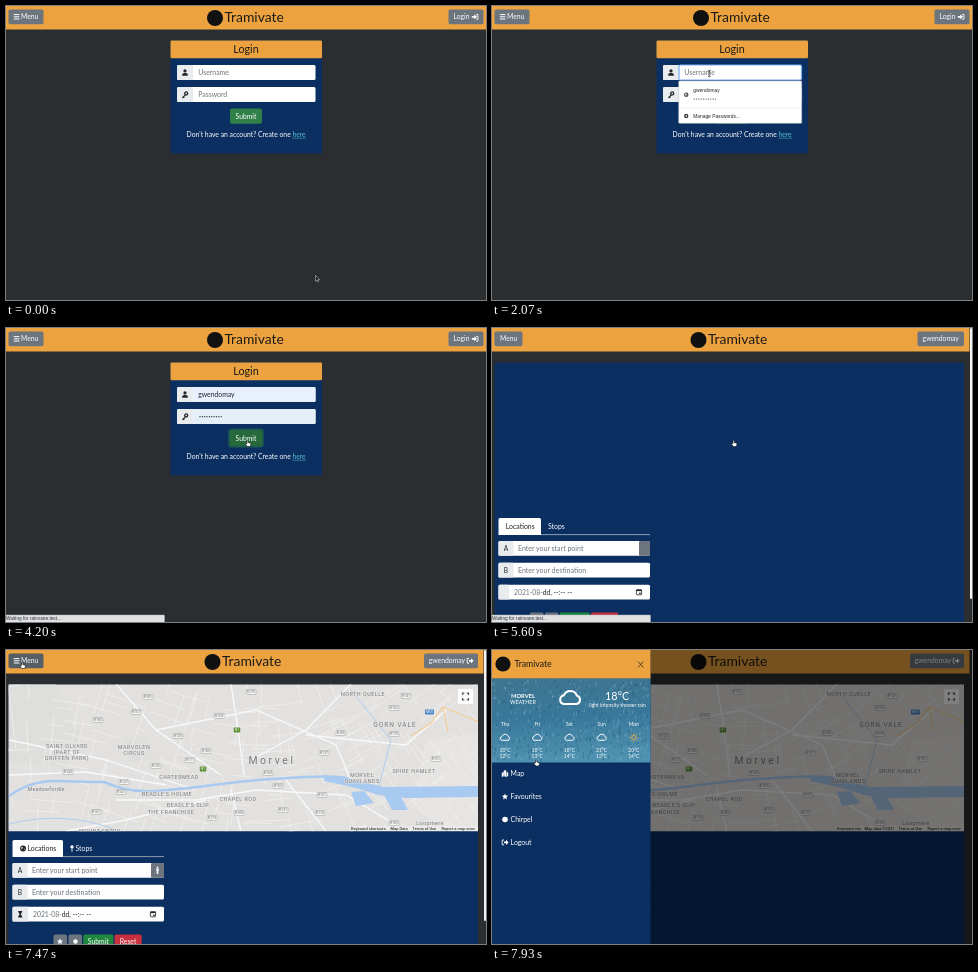
An HTML page that plays this animation: 480 px wide and 294 px high, repeating every 8000 ms.

```html
<!DOCTYPE html>
<html lang="en">
<head>
<meta charset="utf-8">
<title>Tramivate</title>
<style>
  html, body { margin: 0; width: 100%; height: 100%; overflow: hidden; background: #2b2e30; }
  svg { display: block; width: 100vw; height: 100vh; }
  text { font-family: Lato, "Open Sans", sans-serif; white-space: pre; }
  .sys { font-family: "Liberation Sans", Roboto, sans-serif; }
  .map { font-family: Roboto, "Liberation Sans", sans-serif; }
</style>
</head>
<body>
<svg id="stage" viewBox="0 0 480 294" preserveAspectRatio="none"></svg>
<script>
const LOOP = 8000;
const ORANGE = '#eca33f', NAVY = '#0b2f60', DARK = '#2b2e30', GREY = '#6c757d';
const GREEN = '#2f8048', INK = '#212529', PALE = '#e9ecef', WHITE = '#fff';
const BRAND = 'Tramivate', USER = 'gwendomay', CITY = 'Morvel';

const rect = (x, y, w, h, fill, r = 0, extra = '') =>
  `<rect x="${x}" y="${y}" width="${w}" height="${h}" rx="${r}" fill="${fill}" ${extra}/>`;
const text = (x, y, s, size = 6.8, fill = WHITE, extra = '') =>
  `<text x="${x}" y="${y}" font-size="${size}" fill="${fill}" ${extra}>${s}</text>`;
const path = (d, fill = WHITE, extra = '') => `<path d="${d}" fill="${fill}" ${extra}/>`;
const line = (d, color, w = 1, extra = '') =>
  path(d, 'none', `stroke="${color}" stroke-width="${w}" ${extra}`);
const dot = (x, y, r, fill) => `<circle cx="${x}" cy="${y}" r="${r}" fill="${fill}"/>`;
const group = (id, body, extra = '') => `<g id="${id}" ${extra}>${body}</g>`;
const at = (x, y, body) => `<g transform="translate(${x} ${y})">${body}</g>`;
const MID = 'text-anchor="middle"';

// Small linear congruential generator
const random = seed => () => (seed = seed * 16807 % 2147483647) / 2147483647;

// Icons, centred on 0,0
const icon = {
  bars: line('M-2.8-2.2H2.8M-2.8 0H2.8M-2.8 2.2H2.8', WHITE, 1),
  user: dot(0, -1.6, 1.6, INK) + path('M-2.8 3.2V2Q-2.6.4-.9.4H.9Q2.6.4 2.8 2V3.2Z', INK),
  key: line('M.4.4L-2.6 3.2M-1.8 2.2L-.7 3.2', INK, 1.2) +
    '<circle cx="1.2" cy="-1.1" r="1.5" fill="none" stroke="#212529" stroke-width="1.3"/>',
  enter: path('M-3.2-.9H-.7V-2.6L2 0L-.7 2.6V.9H-3.2Z') + line('M1.1-2.4H2.9V2.4H1.1', WHITE, .9),
  exit: path('M-1-.9H1V-2.6L3.6 0L1 2.6V.9H-1Z') + line('M-1-2.4H-2.8V2.4H-1', WHITE, .9),
  star: path('M0-3.2L.9-1.1L3.1-.9L1.4.6L2 2.8L0 1.6L-2 2.8L-1.4.6L-3.1-.9L-.9-1.1Z'),
  person: dot(0, -2.9, .9, WHITE) + path('M-1.2-1.7H1.2V.8H.8V3.6H-.8V.8H-1.2Z'),
  glass: path('M-2.2-3.3H2.2V-2.6H1.8Q1.7-.8.5 0Q1.7.8 1.8 2.6H2.2V3.3H-2.2V2.6H-1.8Q-1.7.8-.5 0Q-1.7-.8-1.8-2.6H-2.2Z', INK),
  pin: dot(0, -1.6, 1.7, WHITE) + line('M0 0V3.2', WHITE, .9),
  globe: dot(0, 0, 3, INK) + path('M-2.3-.9L-.6-1.8L.2-.6L-1 .2L-.7 1.6Q-2 .8-2.3-.9ZM1 .2L2.2 0L1.4 1.8Z', '#c9cdd1'),
  fold: path('M-3.2-1L-1.2-1.8V2.6L-3.2 3.2ZM-.8-1.8L1 -1V3.2L-.8 2.6ZM1.4-1L3.2-1.8V2.4L1.4 3.2Z') + dot(0, -2, 1.4, WHITE),
  date: rect(-2.6, -2.2, 5.2, 5, 'none', .5, 'stroke="#212529" stroke-width=".8"') +
    rect(-2.6, -2.4, 5.2, 1.5, INK) + rect(.2, .6, 1.5, 1.4, INK),
  cloud: line('M-3 2.8H3A2 2 0 0 0 3.2-1.1A3.2 3.2 0 0 0-2.8-1.3A2.1 2.1 0 0 0-3 2.8Z', WHITE, .95),
  sun: line('M0-4.6V4.6M-4.6 0H4.6M-3.2-3.2L3.2 3.2M-3.2 3.2L3.2-3.2', '#e9b04a', .7) + dot(0, 0, 3, '#4d86a3') +
    '<circle r="2.1" fill="none" stroke="#e9b04a" stroke-width=".9"/>'
};

const button = (x, w, body, fill = GREY, extra = '') => rect(x, 3.5, w, 14.7, fill, 1.8, extra) + body;
const header = (w, cx) => rect(0, 0, w, 23.5, ORANGE) + dot(cx, 12, 8, '#111') +
  text(cx + 9.4, 15.6, BRAND, 13.9, '#1d1a16');
const bullets = (x, y, r) =>
  Array.from({ length: 10 }, (_, i) => dot(x + i * 2.35, y, r, INK)).join('');

// Login page
function loginPage() {
  const field = (y, ic, hint, id) =>
    rect(171, y, 138.5, 15, WHITE, 1.5) + path(`M187 ${y}H172.5Q171 ${y} 171 ${y + 1.5}V${y + 13.5}Q171 ${y + 15} 172.5 ${y + 15}H187Z`, PALE) +
    at(179, y + 7.5, ic) + group(id + 'Hint', text(192.3, y + 10, hint, 6.9, GREY));
  const filled = rect(187.3, 59, 122.2, 15, '#e8f0fe', 1.2) + text(192.3, 69, USER, 6.8, INK) +
    rect(187.3, 81, 122.2, 15, '#e5eff7', 1.2) + bullets(194, 88.7, .65);
  const popup = rect(186.7, 75, 123, 42.3, WHITE, .8, 'stroke="#b9c0ca" stroke-width=".5"') +
    group('pick', rect(187, 77.5, 122.4, 22.5, '#e4e6e9')) +
    dot(194.2, 88.7, 2.3, '#4d5156') + path('M192.6 88Q194.5 86.8 194.8 88.4Q194 89.2 194.2 90.4Z', '#dfe3e6') +
    text(201.3, 86.4, USER, 4.9, INK, 'class="sys"') + bullets(202.3, 93, .6) +
    line('M187 102.2H309.4', '#dcdfe3', .5) +
    dot(194.2, 110, 2.2, '#3c4043') + dot(194.2, 110, .8, WHITE) +
    text(201.3, 111.8, 'Manage Passwords...', 4.85, INK, 'class="sys"');
  return header(480, 209) +
    button(2.5, 35, at(10.6, 10.8, icon.bars) + text(15, 13.2, 'Menu')) +
    button(442.5, 35, text(447.5, 13.2, 'Login') + at(469, 10.8, icon.enter)) +
    rect(164.5, 34.5, 151.5, 113, NAVY, 1.5) + rect(164.5, 34.5, 151.5, 17.8, ORANGE, 1.2) +
    text(240, 47, 'Login', 10.8, '#1d1a16', MID) +
    field(59, icon.user, 'Username', 'user') + field(81, icon.key, 'Password', 'pass') +
    group('filled', filled) +
    group('focus', rect(187, 59, 122.5, 15, 'none', 1.2, 'stroke="#78aef5" stroke-width="1.2"')) +
    group('ring', rect(222.3, 100.8, 35.4, 18.6, '#1e5b50', 3)) +
    rect(224, 102.5, 32, 15.3, GREEN, 1.8, 'id="submit"') + text(240, 112.6, 'Submit', 6.8, WHITE, MID) +
    text(180.6, 131, "Don't have an account? Create one") +
    text(286.4, 131, 'here', 6.8, '#55bcd0') + line('M286.4 132.2H300', '#55bcd0', .5) +
    group('popup', popup);
}

// Map
function cityMap() {
  const rnd = random(11);
  let streets = '';
  for (let i = 0; i < 230; i++) {
    const x = rnd() * 475, y = 34 + rnd() * 148;
    const a = Math.sin(x / 90) * .5 - .15 + (rnd() < .5 ? 0 : 1.57), l = 6 + rnd() * 16;
    const dx = Math.cos(a) * l, dy = Math.sin(a) * l;
    streets += `M${(x - dx).toFixed(1)} ${(y - dy).toFixed(1)}L${(x + dx).toFixed(1)} ${(y + dy).toFixed(1)}`;
  }
  const roads = 'M238 125L232 80L225 34M245 110L300 80L345 34M300 85L400 95L440 60M215 125L150 80L110 34' +
    'M190 140L100 110L3 90M200 150L120 170L60 181M225 140L235 181M280 130L320 181M3 125L80 122L160 135' +
    'M150 80L250 60L330 95L345 130M110 150L190 150L250 140L340 145L400 181';
  const water = '#a9cbf1';
  const badges = [142,47, 245,42, 213,66, 62,122, 118,132, 184,110, 200,101, 262,123, 272,136, 318,103,
    316,145, 335,83, 388,84, 388,58, 400,46, 277,160, 314,163, 233,163, 206,168, 130,62, 115,142,
    172,86, 388,173, 92,70, 90,162, 430,109, 150,116];
  let marks = '';
  for (let i = 0; i < badges.length; i += 2) {
    const [x, y] = [badges[i], badges[i + 1]];
    marks += rect(x - 5, y - 2.5, 10, 5, '#f4f4f3', .8, 'stroke="#9c9c9c" stroke-width=".5"') +
      text(x, y + 1.4, 'R' + (101 + i * 37 % 90), 3.6, '#6b6b6b', MID + ' class="map"');
  }
  for (const [x, y] of [[231, 80], [197, 119]])
    marks += rect(x - 3.2, y - 2.5, 6.4, 5, '#5d9133', .8) + text(x, y + 1.3, 'N1', 3.4, WHITE, MID + ' class="map"');
  marks += rect(419, 59.5, 9, 5, '#4a86c9', .8) + text(423.5, 63.3, 'M50', 3.4, WHITE, MID + ' class="map"');
  const label = (x, y, s, size = 5.4, gap = .5) =>
    text(x, y, s, size, '#77787a', `${MID} class="map" letter-spacing="${gap}" stroke="#ebe9e7" stroke-width="1" paint-order="stroke"`);
  const labels = [
    [357, 46, 'NORTH QUELLE'], [389, 77, 'GORN VALE', 6.5, 1], [128, 99, 'MARVOLEN'], [128, 105, 'CIRCUS'],
    [61, 98, 'SAINT OLVARD'], [61, 104, '(PART OF'], [61, 110, 'GRIFFEN PARK)'], [173, 129, 'CARTERMEAD'],
    [161, 146, "BEADLE'S HOLME"], [182, 157, "BEADLE'S SLIP"], [165, 164, 'THE FRANCHISE'], [232, 151, 'CHAPEL ROD'],
    [356, 127, CITY.toUpperCase()], [356, 133, 'QUAYLANDS'], [408, 123, 'SPIRE HAMLET'],
    [40, 141, 'Meadowfordle', 5.4, .2], [424, 175, 'Loopmere', 5.4, .4], [94, 183, 'MOUNT FERRO'],
    [266, 114, CITY, 10.4, 2.6]
  ];
  return rect(2, 34, 471, 148, '#e4e2e0') +
    path('M3 34H50L75 80L60 118L3 112ZM118 90L140 86L148 108L122 112Z', '#dfdfdd') +
    path('M420 90L473 84V181H440L405 155Z', '#e8e6e4') +
    line(streets, '#f3f2f1', .7) + line(roads, '#fafafa', 1.3) +
    line('M3 146Q25 130 52 131T98 132Q122 143 150 141T215 134T300 127T345 132', water, 2.6) +
    path('M318 125Q350 130 378 137L473 136V147L400 148L372 145Q350 137 318 131Z', water) +
    path('M345 142L358 141L368 153L350 156ZM378 145L394 145L402 160H386Z', water) +
    line('M3 174Q60 160 110 180M345 40L385 90L372 140', water, .9) +
    line('M405 86L425 73L437 57L473 72M437 57L442 82', '#f3cf96', 1.2) +
    marks + labels.map(a => label(...a)).join('');
}

// Journey form; "late" is the layout once icons are in
function form(late) {
  const x = late ? 57 : 49, dateX = late ? 27 : 22, goX = late ? 145 : 147, low = late ? 0 : -9.5;
  const row = (y, tag, hint, w) => rect(6.5, y, 151.5, 14.8, WHITE, 1.5) +
    rect(6.5, y, w, 14.8, PALE, 1.2) + text(6.5 + w / 2, y + 9.8, tag, 6.6, INK, MID) + hint;
  const hint = (y, s) => text(26, y, s, 7, GREY);
  const action = (bx, w, fill, s) => rect(bx + low, 284.5, w, 15, fill, 1.6) + text(bx + low + w / 2, 294.4, s, 6.8, WHITE, MID);
  return line(`M${x} 206.6H158`, '#dee2e6', .6) +
    path(`M6.5 207V191.5Q6.5 190 8 190H${x - 1.5}Q${x} 190 ${x} 191.5V207Z`) +
    (late ? at(17, 198.5, icon.globe) + at(66, 198.5, icon.pin) : '') +
    text(late ? 21.5 : 13.8, 200.8, 'Locations', 6.9, INK) + text(late ? 69.5 : 56, 200.8, 'Stops', 6.9) +
    row(213, 'A', hint(222.8, 'Enter your start point'), 15) +
    rect(goX, 213, 158 - goX, 14.8, GREY, 1.2) + (late ? at(151.5, 220.3, icon.person) : '') +
    row(234.8, 'B', hint(244.6, 'Enter your destination'), 15) +
    row(256.8, '', text(dateX, 266.6, '2021-08-<tspan fill="#212529">dd, --:-- --</tspan>', 6.8, GREY), late ? 15.5 : 10.5) +
    at(147, 264, icon.date) + (late ? at(14.2, 264.2, icon.glass) : '') +
    action(47.5, 13.5, GREY, '') + action(62.5, 13.5, GREY, '') +
    (late ? at(54, 291.5, icon.star) + dot(69.5, 291.5, 2.2, WHITE) : '') +
    action(77.3, 30, '#21883f', 'Submit') + action(108.5, 27.2, '#c9303f', 'Reset');
}

function appPage() {
  const legal = (id, a, b, bx) => group(id, rect(343.5, 176, 128.5, 5, '#eeeeed', 0, 'opacity=".8"') +
    [[345, a], [bx, b], [406.5, 'Terms of Use'], [435.5, 'Report a map error']]
      .map(([x, s]) => text(x, 179.8, s, 4, '#111', 'class="map"')).join(''));
  const zoom = rect(452, 39, 15, 15, WHITE, .8) +
    line('M456.5 45V43.2H458.3M460.7 43.2H462.5V45M462.5 48V49.8H460.7M458.3 49.8H456.5V48', '#555', 1.2);
  return rect(0, 0, 480, 294, DARK) + header(477.5, 206.5) +
    rect(2.5, 34.5, 469.5, 260, NAVY, 1) +
    group('early', button(2.5, 28, text(8, 13.2, 'Menu')) + button(425.5, 46.5, text(430.6, 13.2, USER)) + form(false)) +
    group('late', button(2.5, 35, at(10.6, 10.8, icon.bars) + text(15, 13.2, 'Menu'), GREY, 'id="menu"') +
      button(418, 54, text(422.8, 13.2, USER) + at(464, 10.8, icon.exit)) + form(true)) +
    group('map', cityMap(), 'clip-path="url(#mapBox)"') +
    group('tools', zoom + legal('legalA', 'Keyboard shortcuts', 'Map Data', 384.5) +
      legal('legalB', 'Keyboard sho', 'Map data ©2021', 372.5)) +
    group('scroll', rect(478, 0, 2, 271, '#f4f4f4', 1));
}

function weather() {
  const rnd = random(7);
  const drops = n => {
    let d = '';
    for (let i = 0; i < n; i++)
      d += `M${(rnd() * 158).toFixed(1)} ${(29 + rnd() * 80).toFixed(1)}l-.4 ${(1 + rnd() * 3).toFixed(1)}`;
    return d;
  };
  const days = ['Thu 18 12', 'Fri 18 13', 'Sat 18 14', 'Sun 21 13', 'Mon 20 14'].map((d, i) => {
    const [day, hi, lo] = d.split(' '), x = 13 + i * 32.2;
    return text(x, 76.3, day, 5, WHITE, MID) + at(x, 87.5, i < 4 ? icon.cloud : icon.sun) +
      text(x, 102.3, hi + '°C', 5, WHITE, MID) + text(x, 107.9, lo + '°C', 5, WHITE, MID);
  }).join('');
  return rect(0, 28.5, 158.5, 84, 'url(#rain)') +
    line(drops(260), '#1f5877', 1, 'opacity=".5"') + line(drops(260), '#9cc6d8', .8, 'opacity=".4"') +
    text(31, 47.7, CITY.toUpperCase(), 5.8, WHITE, MID + ' font-weight="700"') + text(31, 53.6, 'WEATHER', 5.4, WHITE, MID) +
    `<g transform="translate(78 48) scale(2.15)">${icon.cloud}</g>` +
    text(125, 49.5, '18°C', 10.8, WHITE, MID) + text(125.5, 57.2, 'light intensity shower rain', 5, WHITE, MID) + days;
}

function sidebar() {
  const items = [['Map', icon.fold], ['Favourites', icon.star], ['Chirpel', dot(0, 0, 2.8, WHITE)], ['Logout', icon.exit]];
  return rect(0, 0, 158.5, 294, NAVY) + rect(0, 0, 158.5, 28.7, ORANGE) +
    dot(11, 14, 7.6, '#111') + text(22.5, 17, BRAND, 8.7, '#1d1a16') +
    line('M146 11.5L151.4 17.5M151.4 11.5L146 17.5', '#4a3a22', .9) +
    items.map(([s, ic], i) => at(13, 123.7 + i * 22.9, ic) + text(18.6, 126.2 + i * 22.9, s, 6.9)).join('') +
    group('weather', weather());
}

const arrow = path('M0 0V5.6L1.3 4.5L2.2 6.5L3.2 6L2.3 4.1H4Z', '#111', 'stroke="#e6e6e6" stroke-width=".5"');
const hand = path('M-.5 0Q.4-.5.8.3V2.1L3 2.7Q3.6 3 3.4 4L2.8 6H-.2L-2 3.6Q-1.8 2.7-.5 3Z', WHITE, 'stroke="#111" stroke-width=".6"');
const beam = line('M-1.4-3.2Q0-3.2 0-2.5Q0-3.2 1.4-3.2M0-2.5V2.5M-1.4 3.2Q0 3.2 0 2.5Q0 3.2 1.4 3.2', '#222', .7);

document.getElementById('stage').innerHTML =
  `<defs><clipPath id="mapBox"><rect x="2.5" y="34.5" width="469.5" height="146.8"/></clipPath>
  <linearGradient id="rain" x1="0" y1="0" x2=".1" y2="1"><stop offset="0" stop-color="#3f7590"/>
  <stop offset=".5" stop-color="#39789b"/><stop offset="1" stop-color="#4f91b0"/></linearGradient></defs>` +
  rect(0, 0, 480, 294, DARK) + group('login', loginPage()) + group('app', appPage()) +
  rect(0, 0, 480, 294, '#000', 0, 'id="shade"') + group('side', sidebar()) +
  group('status', rect(-1, 287, 159.5, 8, '#dfe1e3', .8, 'stroke="#b5b8bb" stroke-width=".4"') +
    text(0, 292.2, 'Waiting for rainvane.test...', 4.75, '#33363a', 'class="sys"')) +
  group('cursor', group('arrow', arrow) + group('hand', hand) + group('beam', beam));

const el = {};
document.querySelectorAll('[id]').forEach(e => el[e.id] = e);
const show = (id, on) => el[id].setAttribute('display', on ? 'inline' : 'none');
const clamp = v => Math.min(1, Math.max(0, v));
const ease = p => p < .5 ? 2 * p * p : 1 - 2 * (1 - p) * (1 - p);

// time, x, y
const moves = [
  [0, 309.5, 269.5], [70, 309.5, 269.5], [330, 226, 97], [530, 226, 97], [730, 220, 67], [1330, 220, 67],
  [1400, 217.3, 67.5], [2270, 217.3, 67.5], [2700, 222, 88], [2860, 222, 88], [3470, 241.5, 112.5],
  [6330, 241.5, 112.5], [6730, 16, 12.5], [7660, 16, 12.5], [7920, 44, 110], [LOOP, 44, 110]
];
function pointer(t) {
  const i = moves.findIndex(m => m[0] > t), a = moves[i - 1], b = moves[i];
  const p = ease((t - a[0]) / (b[0] - a[0]));
  return [a[1] + (b[1] - a[1]) * p, a[2] + (b[2] - a[2]) * p];
}

function draw(t) {
  const within = (a, b) => t >= a && t < b;
  const [x, y] = pointer(t);
  const app = t >= 5600;
  show('login', !app);
  show('app', app);

  const picked = t >= 2470, pressed = t >= 3870;
  const over = x > 224 && x < 256 && y > 102.5 && y < 118 && !within(1600, 2730);
  show('filled', picked);
  show('userHint', !picked);
  show('passHint', !picked);
  show('focus', within(1600, 3870));
  show('popup', within(1670, 2730));
  show('pick', picked);
  show('ring', pressed);
  el.submit.setAttribute('fill', pressed ? '#266a3b' : over ? '#286f3e' : GREEN);
  show('status', within(3930, 7200));

  show('early', t < 5670);
  show('late', t >= 5670);
  el.menu.setAttribute('fill', within(6650, 7484) ? '#575f66' : GREY);
  show('map', t >= 6330);
  el.map.setAttribute('opacity', clamp((t - 6300) / 200));
  show('tools', t >= 7200);
  show('legalA', t < 7800);
  show('legalB', t >= 7800);
  show('scroll', t < 7484);

  const slide = ease(clamp((t - 7484) / 300));
  el.shade.setAttribute('opacity', .5 * clamp((t - 7470) / 150));
  show('shade', t >= 7470);
  show('side', t >= 7484);
  el.side.setAttribute('transform', `translate(${-158.5 * (1 - slide)} 0)`);
  show('weather', t >= 7800);

  const inField = !app && x > 187 && x < 309 && (y > 59 && y < 74 || y > 81 && y < 96) && t < 2400;
  const link = over && !app || within(3300, 6400) || within(6650, 7484) || t >= 7850;
  show('beam', inField);
  show('hand', !inField && link);
  show('arrow', !inField && !link);
  el.cursor.setAttribute('transform', `translate(${x} ${y})`);
}

const start = performance.now();
function tick() {
  draw((performance.now() - start) % LOOP);
  requestAnimationFrame(tick);
}
tick();
</script>
</body>
</html>
```
